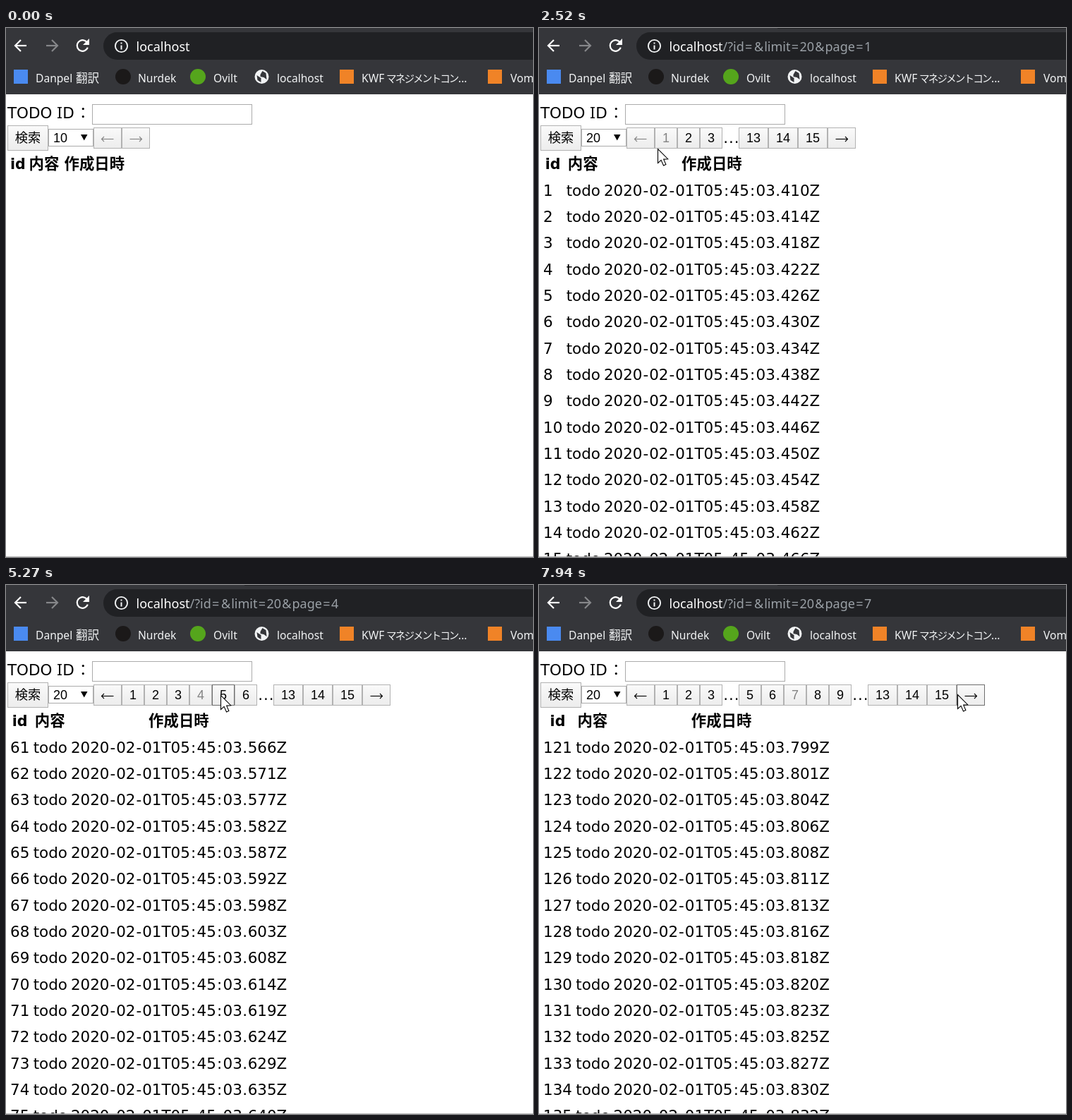
An HTML page with a canvas for the animation above (8 s loop, 747 px wide and 750 px high).

```html
<!DOCTYPE html>
<html lang="ja">
<head>
<meta charset="utf-8">
<title>TODO</title>
<style>
html, body { margin: 0; width: 100%; height: 100%; overflow: hidden; background: #fff; }
canvas { display: block; }
</style>
</head>
<body>
<canvas id="stage" width="747" height="750"></canvas>
<script>
const ctx = document.getElementById('stage').getContext('2d');
const LOOP = 8000;
const STEP = 75;        // pointer refresh
const LATENCY = 150;    // click to address, address to rows
const LAST_PAGE = 15;

const CJK = '"Noto Sans CJK JP", "Noto Sans CJK", sans-serif';
const BODY = '21.45px "DejaVu Sans", sans-serif';
const BODY_BOLD = 'bold 20.6px "DejaVu Sans", sans-serif';
const KANJI_BOLD = 'bold 21.4px ' + CJK;
const UI = '18px "Liberation Sans", Arial, sans-serif';
const URL_FONT = '18px "Noto Sans", sans-serif';
const MARK_FONT = '15.6px "Noto Sans", sans-serif';

// extra room around punctuation
const BODY_PAD = { '-': 2, ':': 2.5, '.': 1 };
const URL_PAD = { '=': 2.8, '&': 2.2 };

// when each page opens, and the milliseconds of its first and 15th row
const PAGES = [
  { at: 1730, from: 410, to: 466 },
  { at: 3740, from: 470, to: 484 },
  { at: 4530, from: 490, to: 543 },
  { at: 5040, from: 566, to: 640 },
  { at: 5550, from: 668, to: 720 },
  { at: 6400, from: 736, to: 777 },
  { at: 7110, from: 799, to: 832 }
];

// pointer moves: a hop to each page button, plus the way in and out
const hops = PAGES.slice(2).map(({ at }, i) => {
  const end = at - LATENCY;
  return { start: end - 130, end, x: 240 + 35 * i, y: 156 };
});
const MOVES = [
  { start: 70, end: 70, x: 564, y: 694 },
  { start: 110, end: 110, x: 520, y: 643 },
  { start: 320, end: 400, x: 196, y: 363 },
  { start: 640, end: 1340, x: 46, y: 157 },
  { start: 2050, end: 2520, x: 168, y: 171 },
  { start: 2600, end: 3350, x: 205, y: 157 },
  ...hops,
  { start: 7480, end: 7700, x: 480, y: 133 },
  { start: 7701, end: 7940, x: 593, y: 155 }
];

function pointerAt(t) {
  let pos = null;
  for (const { start, end, x, y } of MOVES) {
    if (t < start) break;
    const held = Math.floor((t - start) / STEP + 1) * STEP;
    const k = Math.min(1, held / (end - start || 1));
    const ease = k * (2 - k);
    pos = pos
      ? { x: pos.x + (x - pos.x) * ease, y: pos.y + (y - pos.y) * ease }
      : { x, y };
  }
  return pos && { x: Math.round(pos.x), y: Math.round(pos.y) };
}

function rect(x, y, w, h, color) {
  ctx.fillStyle = color;
  ctx.fillRect(x, y, w, h);
}

function disc(x, y, r, color) {
  ctx.fillStyle = color;
  ctx.beginPath();
  ctx.arc(x, y, r, 0, 7);
  ctx.fill();
}

function frame(x, y, w, h, color) {
  ctx.strokeStyle = color;
  ctx.lineWidth = 1;
  ctx.strokeRect(x + .5, y + .5, w - 1, h - 1);
}

function text(str, x, y, font, color = '#000', align = 'left') {
  ctx.font = font;
  ctx.fillStyle = color;
  ctx.textAlign = align;
  ctx.fillText(str, x, y);
}

function spaced(str, x, y, font, color, pads) {
  for (const ch of str) {
    const pad = pads[ch] || 0;
    text(ch, x + pad / 2, y, font, color);
    x += ctx.measureText(ch).width + pad;
  }
}

function trace(points) {
  ctx.beginPath();
  points.forEach(([x, y]) => ctx.lineTo(x, y));
}

function fillShape(points, color) {
  trace(points);
  ctx.fillStyle = color;
  ctx.fill();
}

function arrow(x, y, dir, half, head, color, width) {
  ctx.strokeStyle = color;
  ctx.lineWidth = width;
  const tip = x + half * dir, back = tip - head * dir;
  trace([[x - half * dir, y], [tip, y]]);
  ctx.stroke();
  trace([[back, y - head], [tip, y], [back, y + head]]);
  ctx.stroke();
}

function ring(x, y, r, from, to, color, width) {
  ctx.beginPath();
  ctx.arc(x, y, r, from, to);
  ctx.strokeStyle = color;
  ctx.lineWidth = width;
  ctx.stroke();
}

function globe(x, y) {
  disc(x, y, 10, '#f1f3f4');
  fillShape([[x - 7, y - 2], [x - 1, y + 2], [x - 1, y + 8], [x - 6, y + 5]], '#35363a');
  fillShape([[x + 1, y - 8], [x + 6, y - 5], [x + 7, y + 4], [x + 3, y + 1], [x - 2, y], [x - 2, y - 3]], '#35363a');
}

function drawBrowser(t, page) {
  const white = '#f1f3f4';
  rect(0, 0, 747, 94, '#35363a');
  if (t >= 1500) rect(338, 0, 409, 1, '#202124');
  ctx.fillStyle = '#202124';
  ctx.beginPath();
  ctx.roundRect(138, 6, 660, 39, 19.5);
  ctx.fill();
  arrow(21, 25, -1, 8, 8, '#fff', 2.2);
  arrow(65, 25, 1, 8, 8, '#86878a', 2.2);
  ring(108.5, 25, 7.8, .35, 5.5, '#fff', 2.2);
  fillShape([[118, 15], [118, 24], [109, 24]], '#fff');
  ring(163.5, 25.5, 8.6, 0, 7, white, 1.9);
  rect(162.5, 24.5, 2, 6, white);
  rect(162.5, 20.5, 2, 2, white);
  text('localhost', 184.5, 32.5, URL_FONT, '#fff');
  if (page) spaced('/?id=&limit=20&page=' + page, 260.5, 32.5, URL_FONT, '#9aa0a6', URL_PAD);

  const mark = (label, x) => text(label, x, 76.5, MARK_FONT, white);
  rect(11, 59, 20, 20, '#4a8af0');
  mark('Danpel', 42);
  text('翻訳', 99, 76.5, '16.6px ' + CJK, white);
  disc(166, 69, 11, '#1b1919');
  mark('Nurdek', 187);
  disc(272, 69, 11, '#55a51c');
  mark('Ovilt', 294);
  globe(362.5, 69);
  mark('localhost', 384);
  rect(473, 59, 20, 20, '#f08327');
  mark('KWF', 504);
  ctx.letterSpacing = '-1.9px';
  text('マネジメントコン', 539, 76.5, '14.6px ' + CJK, white);
  ctx.letterSpacing = '0px';
  mark('...', 641);
  rect(683, 59, 20, 20, '#f08327');
  mark('Voma', 715);
}

function button(label, x, y, w, h, tip, disabled, font = UI) {
  const hover = !disabled && tip && tip.x >= x && tip.x < x + w && tip.y >= y && tip.y < y + h;
  const ink = disabled ? '#838383' : '#000';
  const fill = ctx.createLinearGradient(0, y, 0, y + h);
  fill.addColorStop(0, '#fafafa');
  fill.addColorStop(1, '#ececec');
  rect(x, y, w, h, fill);
  frame(x, y, w, h, hover ? '#6e6e6e' : '#b2b2b2');
  const dir = { '←': -1, '→': 1 }[label];
  if (dir) arrow(x + w / 2, 157.5, dir, 8.5, 3.5, ink, 1.1);
  else text(label, x + w / 2, 162, font, ink, 'center');
}

function pagerItems(page) {
  if (!page) return ['←', '→'];
  const shown = n => n <= 3 || n > LAST_PAGE - 3 || Math.abs(n - page) <= 2;
  const items = ['←'];
  for (let n = 1; n <= LAST_PAGE; n++) {
    if (shown(n)) items.push(n);
    else if (shown(n - 1)) items.push('...');
  }
  return items.concat('→');
}

function drawPager(page, tip) {
  let x = 124;
  for (const item of pagerItems(page)) {
    if (item === '...') {
      spaced(item, x + .7, 163, BODY, '#000', BODY_PAD);
      x += 23;
      continue;
    }
    const w = typeof item === 'string' ? 40 : item > 9 ? 42 : 32;
    const disabled = !page || item === page || (item === '←' && page === 1);
    button(item, x, 141, w, 30, tip, disabled);
    x += w;
  }
}

function drawForm(limit, tip) {
  text('TODO', 2, 128, BODY);
  rect(75, 112, 2, 16, '#000');
  rect(73, 112, 6, 1.4, '#000');
  rect(73, 126.6, 6, 1.4, '#000');
  text('D', 80.3, 128, BODY);
  text('：', 98.5, 128, '21.6px ' + CJK);
  frame(122, 108, 227, 29, '#ababab');
  button('検索', 2, 138, 58, 36, tip, false, '18.3px ' + CJK);
  frame(60, 143, 64, 25, '#ababab');
  text(limit, 67, 162, UI);
  fillShape([[106, 151], [115.5, 151], [110.75, 159.5]], '#000');
}

function drawTable(page) {
  if (!page) {
    text('id', 6, 199.5, BODY_BOLD);
    text('内容', 32.5, 199.5, KANJI_BOLD);
    text('作成日時', 82.5, 199.5, KANJI_BOLD);
    return;
  }
  const lastId = page * 20;
  const idX = 6;
  const idWidth = 13.65 * String(lastId).length;
  const todoX = idX + idWidth + 5.4;
  const dateX = todoX + 53.2;
  text('id', idX + idWidth / 2, 199.5, BODY_BOLD, '#000', 'center');
  text('内容', todoX + 23.5, 199.5, KANJI_BOLD, '#000', 'center');
  text('作成日時', dateX + 153, 199.5, KANJI_BOLD, '#000', 'center');
  const { from, to } = PAGES[page - 1];
  for (let i = 0; i < 15; i++) {
    const y = Math.round(237.6 + i * 37.33);
    const ms = Math.round(from + (to - from) * i / 14);
    text(lastId - 19 + i, idX, y, BODY);
    text('todo', todoX, y, BODY);
    spaced(`2020-02-01T05:45:03.${ms}Z`, dateX, y, BODY, '#000', BODY_PAD);
  }
}

function drawPointer({ x, y }) {
  const shape = [[0, 0], [0, 20], [4.6, 15.8], [8, 23.5], [11.4, 22], [8.2, 14.6], [14.2, 14.2]];
  fillShape(shape.map(([px, py]) => [x + .5 + px, y + .5 + py]), '#fff');
  ctx.closePath();
  ctx.strokeStyle = '#000';
  ctx.lineWidth = 1.1;
  ctx.stroke();
}

function draw(t) {
  const page = PAGES.filter(p => t >= p.at).length;
  const loaded = PAGES.filter(p => t >= p.at + LATENCY).length;
  const clicked = PAGES.some(p => t >= p.at - LATENCY && t < p.at);
  const tip = pointerAt(t);
  rect(0, 0, 747, 750, '#fff');
  drawBrowser(t, page);
  drawForm(loaded ? '20' : '10', tip);
  drawPager(loaded && page, tip);
  drawTable(loaded);
  rect(0, 749, 747, 1, '#bdbdbd');
  if (clicked) disc(tip.x, tip.y - .5, 17, 'rgba(240,236,20,.62)');
  if (tip) drawPointer(tip);
}

const begin = performance.now();
function tick() {
  draw((performance.now() - begin) % LOOP);
  requestAnimationFrame(tick);
}
tick();
</script>
</body>
</html>
```
